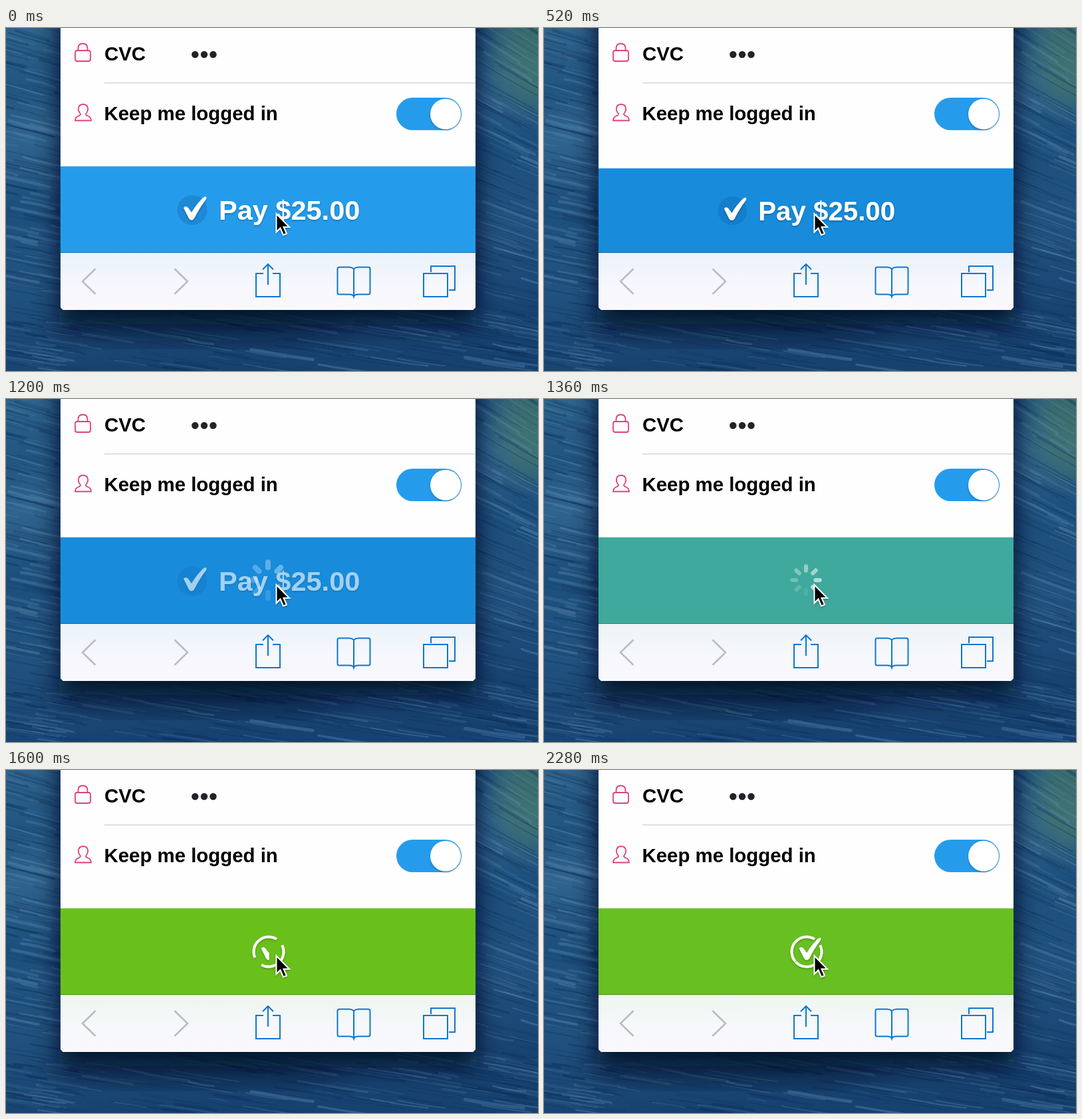
An HTML page for the animation above (2320 ms loop, 800 px wide and 517 px high).

```html
<!DOCTYPE html>
<html lang="en">
<head>
<meta charset="utf-8">
<title>Pay button</title>
<style>
  html, body { margin: 0; height: 100%; overflow: hidden; background: #174573; }
  svg { display: block; width: 100vw; height: 100vh; }
  text { font: bold 29.4px "Liberation Sans", Arial, sans-serif; }
  #pay text { font-size: 41.5px; fill: #fff; }
</style>
</head>
<body>
<svg viewBox="0 0 800 517">
  <defs>
    <linearGradient id="sea" x2=".2" y2="1">
      <stop offset="0" stop-color="#2f658e"/>
      <stop offset=".17" stop-color="#225580"/>
      <stop offset=".32" stop-color="#30648e"/>
      <stop offset=".5" stop-color="#1d4f7c"/>
      <stop offset=".72" stop-color="#225380"/>
      <stop offset="1" stop-color="#174270"/>
    </linearGradient>
    <linearGradient id="bar" x2="0" y2="1">
      <stop offset="0" id="tint"/>
      <stop offset=".6" stop-color="#f7f8fc"/>
      <stop offset="1" stop-color="#f9f8fc"/>
    </linearGradient>
    <filter id="drop" x="-30%" y="-30%" width="160%" height="160%">
      <feGaussianBlur stdDeviation="18"/>
    </filter>
    <filter id="soft" x="-20%" y="-20%" width="140%" height="150%">
      <feDropShadow dx="0" dy="1.5" stdDeviation="1.5" flood-opacity=".28"/>
    </filter>
    <clipPath id="wipe"><rect id="wipeBox" x="262" y="245" height="50"/></clipPath>
    <path id="tick" d="M267 271Q270 267 274 271L279 278Q286 266 296 256Q303 251 301 258Q291 271 283 287Q279 292 275 287Z"/>
  </defs>

  <rect width="800" height="517" fill="url(#sea)"/>
  <ellipse cx="790" cy="40" rx="50" ry="80" fill="#4a7c62" opacity=".6" filter="url(#drop)"/>
  <g id="waves" fill="none" stroke-linecap="round"/>
  <ellipse cx="290" cy="452" rx="230" ry="20" fill="#020d20" opacity=".4" filter="url(#drop)"/>
  <rect x="80" y="-60" width="628" height="506" fill="#020d20" opacity=".88" filter="url(#drop)"/>

  <path d="M82 0H706V421L702 425H86L82 421Z" fill="#fefefe"/>
  <g fill="none" stroke="#e0407f" stroke-width="1.8" transform="translate(0 -.5)">
    <rect x="104" y="34.5" width="23" height="16" rx="3"/>
    <path d="M108.5 34V31Q108.5 24 115.5 24T122.5 31V34"/>
    <path d="M112 130Q108 125 109 121Q110 115.5 116 115.5T123 121Q124 125 120 130Q120 132 123 133Q128 135 128 140H104Q104 135 109 133Q112 132 112 130Z"/>
  </g>
  <text x="148" y="48.5">CVC</text>
  <text x="147.5" y="138.5">Keep me logged in</text>
  <g fill="#222228">
    <circle cx="284.3" cy="40" r="5.2"/>
    <circle cx="298" cy="40" r="5.2"/>
    <circle cx="311.5" cy="40" r="5.2"/>
  </g>
  <path d="M148 82.8H706" stroke="#d6d6da" stroke-width="1.5"/>
  <rect x="587" y="105" width="98" height="49" rx="24.5" fill="#259ceb"/>
  <circle cx="661" cy="129.700" r="23" fill="#fff" filter="url(#soft)"/>

  <rect id="button" x="82" width="624"/>
  <g id="pay">
    <circle cx="280" cy="274.5" r="22.5" fill="#0a5ea8" opacity=".3"/>
    <g filter="url(#soft)">
      <use href="#tick" fill="#fff"/>
      <text x="320" y="289">Pay $25.00</text>
    </g>
  </g>
  <g id="spinner" stroke="#fff" stroke-width="8" stroke-linecap="round"/>
  <g id="done" filter="url(#soft)">
    <path id="ring" fill="none" stroke="#fff" stroke-width="4"/>
    <use href="#tick" fill="#fff" clip-path="url(#wipe)" transform="translate(129.5 11) scale(.952)"/>
  </g>

  <path d="M82 339H706V421L702 425H86L82 421Z" fill="url(#bar)"/>
  <path d="M82 338.5H706" stroke="#000" stroke-opacity=".25"/>
  <g fill="none" stroke="#b9bbc0" stroke-width="2.5">
    <path d="M134.5 363L115 382L134.5 401M253.5 363L273 382L253.5 401"/>
    <g stroke="#0f76d0" stroke-width="2">
      <path d="M387 370H376V405H412V370H401M394 387V356M386 364L394 356L402 364"/>
      <path d="M523 363Q520 360.5 516 360.5H501Q498.5 360.5 498.5 363V399Q498.5 401.5 501 401.5H516Q522 401.5 523 405Q524 401.5 530 401.5H545Q547.5 401.5 547.5 399V363Q547.5 360.5 545 360.5H530Q526 360.5 523 363V405"/>
      <path d="M628 370H664V405H628ZM639 368V359H675V395H666"/>
    </g>
  </g>
  <path d="M406.5 280V307.5L412.5 301.5L417 312L422 310L417.5 300H426Z" stroke="#fff" stroke-width="2" filter="url(#soft)"/>
</svg>
<script>
const LOOP = 2320, STEP = 40;
const $ = id => document.getElementById(id);
const set = (el, attrs) => { for (const k in attrs) el.setAttribute(k, attrs[k]); return el; };
const add = (parent, tag, attrs) =>
  parent.appendChild(set(document.createElementNS(parent.namespaceURI, tag), attrs));
const ramp = (t, a, b) => Math.min(1, Math.max(0, (t - a) / (b - a)));
const mix = (a, b, p) => a.map((v, i) => v + (b[i] - v) * p);
const rgb = c => `rgb(${c.map(Math.round)})`;

let seed = 7;
const rand = () => (seed = seed * 16807 % 2147483647) / 2147483647;

// Long thin ripples; the swell is steepest at the upper right
function ripple(x, y) {
  const len = 25 + rand() * 85, drop = len * (x > 650 ? .65 - y / 1000 : .3 - y / 3500);
  const sag = rand() * 6 - 3;
  add($('waves'), 'path', {
    d: `M${x - len / 2} ${y - drop / 2}q${len / 2} ${drop / 2 + sag} ${len} ${drop}`,
    stroke: rand() < .45 ? '#6293b8' : '#08294f',
    'stroke-width': .8 + rand() * rand() * 5,
    opacity: .12 + rand() * .25
  });
}
for (let i = 0; i < 170; i++) {
  ripple(rand() * 110 - 10, rand() * 517);
  ripple(695 + rand() * 110, rand() * 517);
  ripple(rand() * 800, 425 + rand() * 95);
}

const spokes = Array.from({ length: 8 }, (_, i) =>
  add($('spinner'), 'path', { d: 'M0 -19V-27', transform: `rotate(${i * 45})` }));

const BLUE = [37, 156, 235], MID = [24, 140, 219], DEEP = [0, 119, 196];
const LIME = [114, 196, 0], GREEN = [104, 191, 34];
const colors = [[0, BLUE], [480, BLUE], [520, MID], [600, DEEP], [1120, DEEP],
  [1200, MID], [1280, BLUE], [1320, BLUE], [1440, LIME], [1640, GREEN], [LOOP, GREEN]];

function colorAt(t) {
  const i = colors.findIndex(k => k[0] > t);
  const [a, from] = colors[i - 1], [b, to] = colors[i];
  return mix(from, to, ramp(t, a, b));
}

const polar = deg => {
  const a = deg * Math.PI / 180;
  return `${395 + 22.5 * Math.cos(a)} ${274 + 22.5 * Math.sin(a)}`;
};
const arc = (start, sweep) =>
  `M${polar(start)}A22.5 22.5 0 0 ${sweep > 0 ? 1 : 0} ${polar(start + sweep)}`;

function draw(t) {
  const color = colorAt(t);
  const press = ramp(t, 480, 520) - ramp(t, 1120, 1200);
  const top = 208.5 + 3 * press;
  set($('button'), { y: top, height: 340 - top, fill: rgb(color) });
  set($('tint'), { 'stop-color': rgb(mix([247, 248, 252], color, .06)) });
  set($('pay'), {
    transform: `translate(394 310) scale(${1 - .03 * press}) translate(-394 -310)`,
    opacity: 1 - ramp(t, 1140, 1290)
  });

  set($('spinner'), {
    transform: `translate(394 273) scale(${1 - .35 * ramp(t, 1200, 1440)})`,
    opacity: .8 * ramp(t, 1140, 1260) * (1 - ramp(t, 1360, 1480))
  });
  const head = 1 + Math.floor((t - 1200) / 80);
  spokes.forEach((s, i) => set(s, { opacity: .88 - .11 * (((head - i) % 8 + 8) % 8) }));

  const grow = 163 * ramp(t, 1360, 1630);
  set($('done'), { visibility: grow ? 'visible' : 'hidden' });
  set($('ring'), { d: arc(-58, -grow) + arc(-26, grow) });
  set($('wipeBox'), { width: 44 * ramp(t, 1520, 1720) });
}

function frame(now) {
  draw(Math.floor(now % LOOP / STEP) * STEP);
  requestAnimationFrame(frame);
}
draw(0);
requestAnimationFrame(frame);
</script>
</body>
</html>
```
